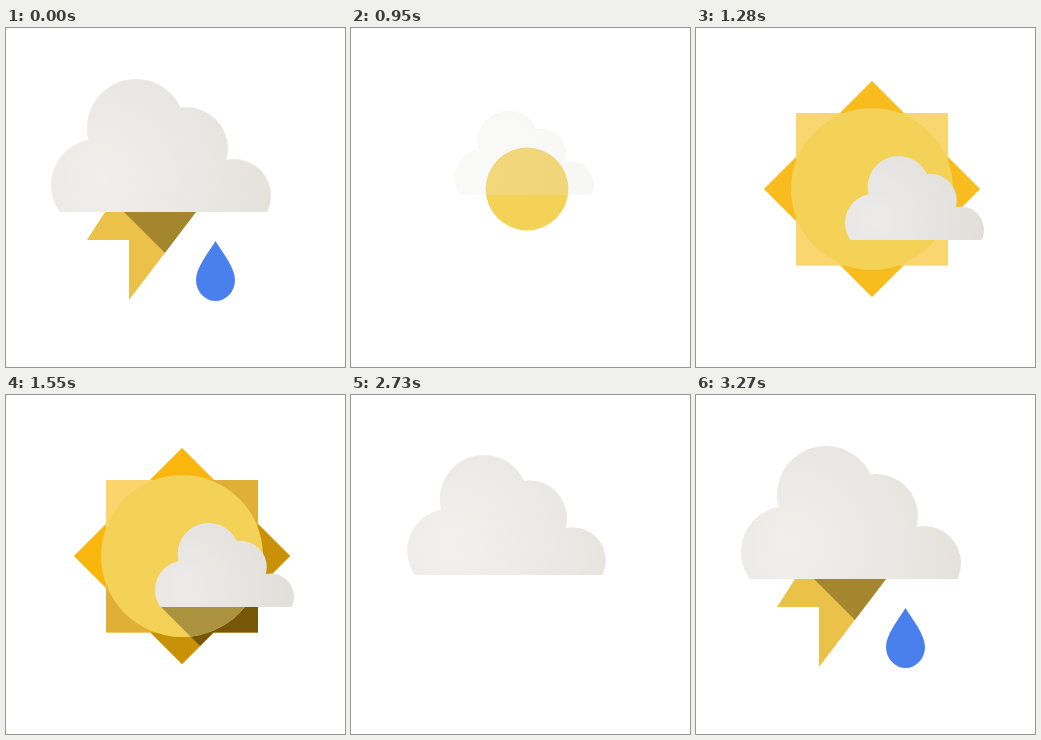
Write an HTML page with a canvas that moves like this. It is 339x339 px and loops after 3300 ms.

```html
<!DOCTYPE html>
<html>
<head>
<meta charset="utf-8">
<title>Storm and sun</title>
<style>
html, body { margin: 0; width: 100%; height: 100%; overflow: hidden; background: #fff; }
canvas { display: block; width: 100vw; height: 100vh; }
</style>
</head>
<body>
<canvas id="stage" width="339" height="339"></canvas>
<script>
const ctx = document.getElementById('stage').getContext('2d');
const LOOP = 3300, SLIDE = 60;

const clamp = v => Math.max(0, Math.min(1, v));
const ramp = (t, start, length) => clamp((t - start) / length);
const easeOut = u => 1 - (1 - u) ** 3;

// Run a drawing with its own transform, clip and opacity
function layer(alpha, draw) {
  ctx.save();
  ctx.globalAlpha *= clamp(alpha);
  draw();
  ctx.restore();
}

function zoom(x, y, scale) {
  ctx.translate(x, y);
  ctx.scale(scale, scale);
  ctx.translate(-x, -y);
}

function poly(...points) {
  const path = new Path2D();
  points.forEach(([x, y]) => path.lineTo(x, y));
  path.closePath();
  return path;
}

function fill(path, color, alpha = 1) {
  layer(alpha, () => {
    ctx.fillStyle = color;
    ctx.fill(path);
  });
}

function clipRect(x, y, w, h) {
  ctx.beginPath();
  ctx.rect(x, y, w, h);
  ctx.clip();
}

const cloudPath = new Path2D();
for (const [x, y, r] of [[91, 157, 46], [130, 100, 49], [180, 121, 42], [228, 168, 37]]) {
  cloudPath.moveTo(x + r, y);
  cloudPath.arc(x, y, r, 0, 7);
}
cloudPath.rect(91, 130, 129, 54);

function cloud(inner, outer) {
  const shade = ctx.createRadialGradient(95, 150, 0, 95, 150, 180);
  shade.addColorStop(0, inner);
  shade.addColorStop(1, outer);
  clipRect(0, 0, 339, 184);
  fill(cloudPath, shade);
}

const boltPath = poly([81, 212], [123, 212], [123, 272], [243.3, 114], [144, 114]);
const boltShade = poly([48, 114], [300, 114], [300, 366]);

function bolt(shift, shade) {
  clipRect(0, 184, 339, 155);
  ctx.translate(shift, -shift);
  fill(boltPath, '#ecc149');
  ctx.clip(boltPath);
  fill(boltShade, '#a4862f', shade);
}

const dropPath = new Path2D(
  'M209.5 213C217 225 229 240 229 252A19.5 21 0 0 1 190 252C190 240 202 225 209.5 213Z');

function drop(shift, scale) {
  ctx.translate(0, shift);
  zoom(209.5, 243, scale);
  fill(dropPath, '#4a80ee');
}

// leave: 0 to 1 on the way out
function storm(t, leave) {
  const grow = leave < 0 ? easeOut(ramp(t, 2550, 333)) : 1;
  const enter = leave < 0 ? easeOut(ramp(t, 2760, 300)) : 1;
  const tint = leave < 0 ? ramp(t, 3060, 210) : 1;
  const out = Math.max(0, leave);
  const fade = 1 - out * out;
  const visible = enter * (0.85 + 0.15 * tint);

  if (enter > 0) {
    layer(fade * visible, () => bolt(SLIDE * (1 - enter + out), tint));
    layer((1 - out) * visible, () =>
      drop(SLIDE * (out - 1 + enter), Math.max(0, enter - out)));
  }
  layer(fade * grow, () => {
    zoom(160, 143, grow);
    cloud('#f0efed', '#e4e1db');
  });
}

const square = poly([-76, -76], [76, -76], [76, 76.5], [-76, 76.5]);
const diamond = poly([0, -108], [108, 0], [0, 108], [-108, 0]);
const squareShade = poly([0, -76], [76, -76], [76, 76.5], [-76, 76.5], [-76, 0]);
const diamondShade = poly([54, -54], [108, 0], [0, 108], [-54, 54]);
const cloudShade = poly([-21, 51], [79, 151], [130, 151], [130, 51]);
const disc = new Path2D();
disc.arc(0, 0, 81, 0, 7);
const rays = new Path2D(square);
rays.addPath(diamond);

function sun(t) {
  const discScale = easeOut(ramp(t, 880, 330));
  const enter = easeOut(ramp(t, 920, 333));
  const tint = ramp(t, 1100, 210);
  const shade = ramp(t, 1310, 240);

  layer(1, () => {
    ctx.translate(176, 161);
    layer(enter, () => {
      ctx.rotate((1 - enter) * 64 * Math.PI / 180);
      ctx.scale(enter, enter);
      fill(rays, '#fce28d');
      fill(diamond, '#f9b60d', tint);
      fill(square, '#fbd46c', tint);
      fill(diamondShade, '#c99107', shade);
      fill(squareShade, '#e0b036', shade);
      ctx.clip(rays);
      fill(cloudShade, '#76570a', shade);
    });
    ctx.scale(discScale, discScale);
    fill(disc, '#f4d257');
    ctx.clip(disc);
    fill(cloudShade, '#ab923e', shade);
  });

  layer(enter, () => {
    const shift = -SLIDE * (1 - enter);
    ctx.translate(120.5 + shift, 95.7 + shift);
    ctx.scale(0.632, 0.632);
    cloud('#ecebea', '#dfded8');
  });
}

function render(now) {
  let t = now % LOOP;
  // The motion advances in steps of 30 ms
  const anchor = t < 2550 ? 800 : 2550;
  t = anchor + 30 * Math.floor((t - anchor) / 30);

  ctx.clearRect(0, 0, 339, 339);
  if (t < 890) storm(t, t < 800 ? 0 : ((t - 770) / 95) ** 2);
  else if (t < 2550) sun(t);
  else storm(t, -1);
}

let start;
function frame(now) {
  start ??= now;
  render(now - start);
  requestAnimationFrame(frame);
}
render(0);
requestAnimationFrame(frame);
</script>
</body>
</html>
```
